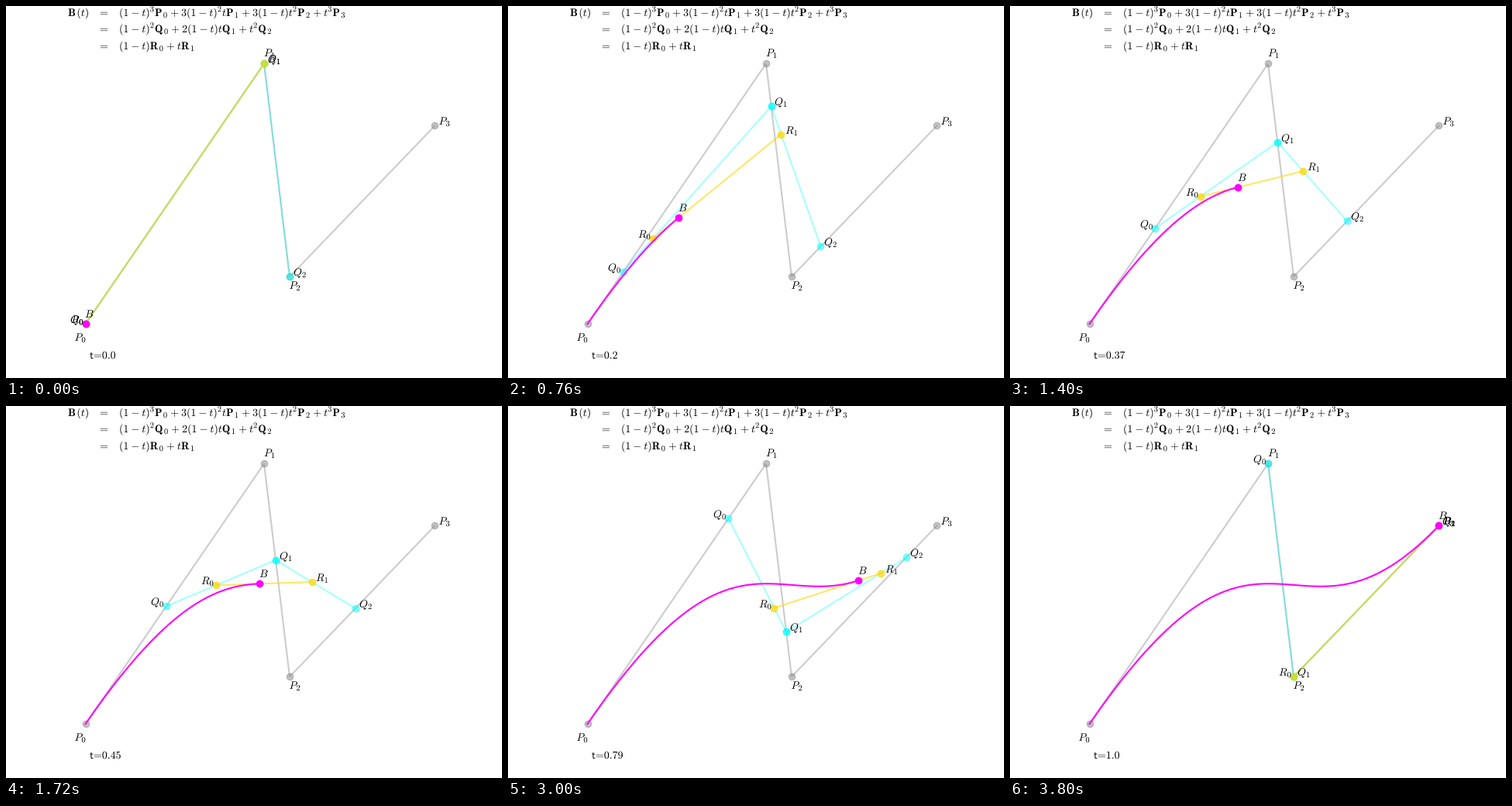
Write a matplotlib script that moves like this. It is 640 px wide and 480 px high and loops after 3.84 s.

```python
import numpy as np
import matplotlib.pyplot as plt
from matplotlib.animation import FuncAnimation
from matplotlib.patches import PathPatch
from matplotlib.path import Path
from matplotlib.textpath import TextPath
from matplotlib.transforms import Affine2D

plt.rcParams["mathtext.fontset"] = "cm"

W, H, DPI = 640, 480, 100
FRAMES, STEP_MS = 96, 40
EM = 10 * DPI / 72

# Advance widths in em, as TeX sets them
ITALIC = {"B": .759, "P": .642, "Q": .791, "R": .759, "t": .361}
BOLD = {"B": .818, "P": .786, "Q": .864, "R": .862}
OTHER = {"(": .389, ")": .389, ".": .278, "+": .778, "-": .778, "=": .778}
SCRIPT_ADVANCE = .448
SCRIPT_SHIFT = {"^": .413, "_": -.15}

glyphs = {}


def glyph(char, font, size):
    """Outline of one character with y pointing down."""
    key = char, font, size
    if key not in glyphs:
        tex = f"${{{char}}}$" if char in "+-=" else rf"$\{font}{{{char}}}$"
        path = TextPath((0, 0), tex, size=size)
        verts = path.vertices * [1, -1]
        if char in "+-=":
            # centre operators in their advance width
            box = path.get_extents()
            verts[:, 0] += .389 * size - (box.x0 + box.x1) / 2
        glyphs[key] = Path(verts, path.codes)
    return glyphs[key]


def typeset(src, capitals="mathit", sans=False):
    """Lay out a short formula from the origin; ^ and _ raise or lower one digit."""
    x, script, parts = 0, None, []
    for char in src:
        if char in SCRIPT_SHIFT:
            script = char
            continue
        font, advance, pad, size, dy = "mathrm", OTHER.get(char, .5), 0, EM, 0
        if script:
            advance, size = SCRIPT_ADVANCE, .75 * EM
            dy = -SCRIPT_SHIFT[script] * EM
            script = None
        elif sans:
            font = "mathsf"
            advance = .361 if char == "t" else advance
        elif char in BOLD and capitals == "mathbf":
            font, advance = "mathbf", BOLD[char]
        elif char in ITALIC:
            font, advance = "mathit", ITALIC[char]
        elif char in "+-":
            pad = .222
        g = glyph(char, font, size)
        parts.append(Path(g.vertices + [x + pad * EM, dy], g.codes))
        x += (advance + 2 * pad) * EM
    return Path.make_compound_path(*parts)


fig = plt.figure(figsize=(W / DPI, H / DPI), dpi=DPI, facecolor="white")
ax = fig.add_axes([0, 0, 1, 1])
ax.set_xlim(0, W)
ax.set_ylim(H, 0)
ax.axis("off")


def move(patch, x, y):
    patch.set_transform(Affine2D().translate(x, y) + ax.transData)


def write(x, y, src, **style):
    patch = PathPatch(typeset(src, **style), fc="black", lw=0, zorder=5, snap=False)
    ax.add_patch(patch)
    move(patch, x, y)
    return patch


def line(color, alpha=1):
    return ax.plot([], [], color=color, alpha=alpha, lw=1.5)[0]


def dots(color, alpha=1):
    return ax.plot([], [], "o", color=color, alpha=alpha, ms=6)[0]


P = np.array([(102.5, 410.4), (333, 74.4), (366, 349.3), (553.45, 154.4)])


def reduce_points(pts, t):
    return (1 - t) * pts[:-1] + t * pts[1:]


def levels(t):
    q = reduce_points(P, t)
    r = reduce_points(q, t)
    return q, r, reduce_points(r, t)[0]


times = np.arange(FRAMES) / (FRAMES - 1)
curve = np.array([levels(t)[2] for t in times])

line("gray", .4).set_data(*P.T)
dots("gray", .45).set_data(*P.T)
q_line, q_dots = line("cyan", .35), dots("cyan", .5)
r_line, r_dots = line("gold", .6), dots("gold", .7)
trail, b_dot = line("magenta"), dots("magenta")

ROWS = [
    "(1-t)^3P_0+3(1-t)^2tP_1+3(1-t)t^2P_2+t^3P_3",
    "(1-t)^2Q_0+2(1-t)tQ_1+t^2Q_2",
    "(1-t)R_0+tR_1",
]
write(80, 13, "B(t)", capitals="mathbf")
for y, row in zip((13, 34, 56), ROWS):
    write(121, y, "=")
    write(146, y, row, capitals="mathbf")

for k, (x, y) in enumerate([(88.5, 432), (333, 65), (365.5, 365), (558.5, 153)]):
    write(x, y, f"P_{k}")

# Label offsets from their points
OFFSETS = {"Q_0": (-19.5, -1), "Q_1": (4.7, -1), "Q_2": (4.7, -1),
           "R_0": (-19, -1), "R_1": (5.5, -1), "B": (0, -8)}
labels = {name: write(0, 0, name) for name in OFFSETS}
clock = write(108, 455, "t=0.0", sans=True)


def update(i):
    t = times[i]
    q, r, b = levels(t)
    q_line.set_data(*q.T)
    q_dots.set_data(*q[[0, 1, 1, 2]].T)  # the shared point is drawn twice
    r_line.set_data(*r.T)
    r_dots.set_data(*r.T)
    trail.set_data(*curve[:i + 1].T)
    b_dot.set_data([b[0]], [b[1]])
    for (name, offset), point in zip(OFFSETS.items(), [*q, *r, b]):
        move(labels[name], *np.round(point + offset))
    clock.set_path(typeset(f"t={round(float(t), 2)}", sans=True))
    return []


anim = FuncAnimation(fig, update, frames=FRAMES, interval=STEP_MS,
                     repeat=True, repeat_delay=0)
plt.show()
```
